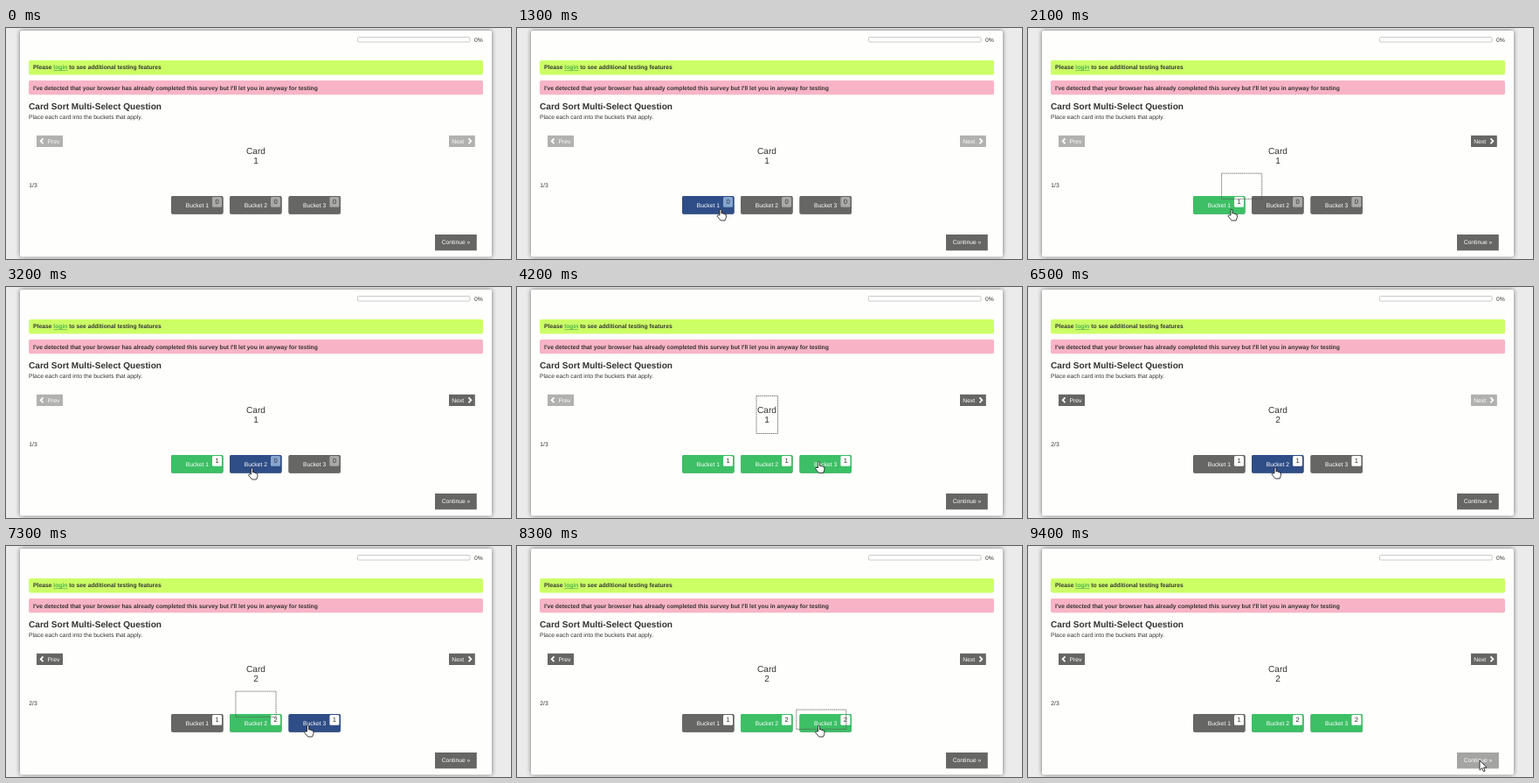
An HTML page that plays this animation: 578x264 px, repeating every 9500 ms.

```html
<!DOCTYPE html>
<html lang="en">
<head>
<meta charset="utf-8">
<title>Card Sort</title>
<style>
  html, body { margin: 0; width: 100%; height: 100%; overflow: hidden; background: #ebebeb; }
  svg { display: block; font: 6.75px "Liberation Sans", Arial, sans-serif; fill: #333; text-rendering: geometricPrecision; }
  .panel { fill: #fefefc; filter: drop-shadow(0 0 2.5px #0008); }
  .b { font-weight: bold; }
  .big { font-size: 10.1px; }
  .mid { text-anchor: middle; }
  .white { fill: #fff; }
  .btn { filter: drop-shadow(.5px .7px .6px #0007); }
  .arrow { fill: none; stroke: #fff; stroke-width: 1.8; }
  .ghost { fill: none; stroke: #555; stroke-width: .8; stroke-dasharray: 1.2 .6; }
  .cursor { fill: #fff; stroke: #111; stroke-width: .8; stroke-linejoin: round; }
</style>
</head>
<body>
<svg width="578" height="264" viewBox="0 0 578 264">
  <rect class="panel" x="16" y="3" width="540" height="258.5" rx="2"/>
  <rect x="402.5" y="10.5" width="128.5" height="5.5" rx="1" fill="#fff" stroke="#c4c4c4" stroke-width=".9"/>
  <text x="536" y="15.8">0%</text>
  <rect x="26" y="37" width="520" height="16.5" rx="2" fill="#ccff66"/>
  <text class="b" x="31" y="47.4">Please <tspan fill="#4cae4c" text-decoration="underline">login</tspan> to see additional testing features</text>
  <rect x="26" y="60" width="520" height="16.3" rx="2" fill="#f8b4c6"/>
  <text class="b" x="31" y="70.9">I've detected that your browser has already completed this survey but I'll let you in anyway for testing</text>
  <text class="b big" x="26" y="92.6">Card Sort Multi-Select Question</text>
  <text x="26" y="104">Place each card into the buckets that apply.</text>
  <g id="live"></g>
</svg>
<script>
const LOOP = 9500, STEP = 100, NEXT_CLICK = 5700;
const GRAY = '#666664', FADED = '#b1b1af', GREEN = '#3dbf65', BLUE = '#2f4d86';
const bucketX = [189, 256, 323.4], bucketBox = { y: 192, w: 59.6, h: 20.7 };
const cardBox = [274, 124.5, 298.5, 167.5];
// Click times per card, one entry per bucket
const clicks = [[1800, 3300, 4200], [Infinity, 7000, 7900]];
// Cursor path: time, x, y
const path = [
  [1300, 233, 207], [2400, 233, 207], [2700, 281.5, 207], [3600, 281.5, 207],
  [3800, 345.5, 199.5], [4600, 345.5, 199.5], [4800, 522, 111], [5000, 522, 112],
  [5200, 522, 112], [5300, 521.5, 128.5], [5900, 521.5, 128.5], [6500, 283, 206],
  [7000, 283, 206], [7300, 345.5, 205], [8400, 345.5, 205], [8500, 455, 244],
  [8700, 457, 245], [8900, 457, 245], [9000, 517, 245], [LOOP, 517, 245]
];
const live = document.getElementById('live');
const lerp = (a, b, p) => a + (b - a) * p;
const swing = p => .5 - Math.cos(Math.PI * Math.min(1, Math.max(0, p))) / 2;
const rect = (x, y, w, h, fill, rx = 0, cls = '') =>
  `<rect x="${x}" y="${y}" width="${w}" height="${h}" rx="${rx}" fill="${fill}" class="${cls}"/>`;
const text = (x, y, s, cls = '') => `<text x="${x}" y="${y}" class="${cls}">${s}</text>`;

function cursorAt(t) {
  if (t < path[0][0]) return [-99, -99];
  const i = path.findIndex(k => k[0] > t), a = path[i - 1], b = path[i];
  const p = swing((t - a[0]) / (b[0] - a[0]));
  return [lerp(a[1], b[1], p), lerp(a[2], b[2], p)];
}

function ghost(t, click, x) {
  if (t < click || t >= click + 500) return '';
  const p = swing((t - click - 70) / 400);
  const goal = [x, bucketBox.y, x + bucketBox.w, bucketBox.y + bucketBox.h];
  const [l, u, r, d] = cardBox.map((v, i) => lerp(v, goal[i], p));
  return rect(l, u, r - l, d - u, 'none', 0, 'ghost');
}

function draw(t) {
  const [cx, cy] = cursorAt(t);
  const over = (x, y, w, h) => cx >= x && cx <= x + w && cy >= y && cy <= y + h;
  const second = t >= NEXT_CLICK, current = clicks[+second];
  const sorted = current.some(c => t >= c);
  const nextOn = sorted && !over(507, 123, 30, 13);
  let out = '', ghosts = '', hand = false;

  out += rect(35, 122.8, 30, 13.2, second ? GRAY : FADED);
  out += '<path class="arrow" d="M42.5 126.4l-2.8 2.9 2.8 2.9"/>' + text(47.5, 131.8, 'Prev', 'white');
  out += rect(507, 122.8, 29.8, 13.2, nextOn ? GRAY : FADED);
  out += '<path class="arrow" d="M529.5 126.4l2.8 2.9 -2.8 2.9"/>' + text(510.3, 131.8, 'Next', 'white');

  // Card fades out, then the following one fades in
  const fade = second ? Math.abs(Math.cos(Math.PI * Math.min(1, (t - NEXT_CLICK) / 800))) : 1;
  const card = t >= NEXT_CLICK + 400 ? 2 : 1;
  out += `<g opacity="${fade}">${text(286, 144.4, 'Card', 'big mid')}${text(286, 154.6, card, 'big mid')}</g>`;
  out += text(26.3, 182.3, second ? '2/3' : '1/3');

  bucketX.forEach((x, i) => {
    const { y, w, h } = bucketBox, hover = over(x, y, w, h);
    const count = clicks.filter(c => t >= c[i]).length;
    const chosen = t >= current[i];
    hand ||= hover;
    out += rect(x, y, w, h, chosen ? GREEN : hover ? BLUE : GRAY, 2, 'btn');
    out += text(x + w / 2, 204.5, 'Bucket ' + (i + 1), 'white mid');
    out += rect(x + 47, 193, 11, 11.7, count ? '#fcfcfa' : hover ? '#86a6cf' : '#a9a9a7', 1.5);
    out += `<g font-size="7.6">${text(x + 52.5, 201.3, count, 'mid')}</g>`;
    clicks.forEach(c => ghosts += ghost(t, c[i], x));
  });

  out += rect(491, 236, 47.6, 18.2, over(491, 236, 47.6, 18.2) ? '#a4a4a2' : GRAY, 0, 'btn');
  out += text(515, 247.4, 'Continue »', 'white mid') + ghosts;
  const shape = hand
    ? 'M-1 7V.7Q0-.8 1 .7V5l1.4-.4 .7.9 1.4-.2 .6.9 1.3.2V9.4L5.1 13H.1L-3.9 8.2Q-3.8 6.6-2.5 6.9Z'
    : 'M0 0V11.2L2.6 8.8 4.4 12.8 6.2 12 4.4 8.2H8Z';
  live.innerHTML = out + `<path class="cursor" transform="translate(${cx} ${cy})" d="${shape}"/>`;
}

const start = performance.now();
let last = -1;
function tick() {
  const t = Math.floor((performance.now() - start) % LOOP / STEP) * STEP;
  if (t !== last) draw(last = t);
  requestAnimationFrame(tick);
}
tick();
</script>
</body>
</html>
```
